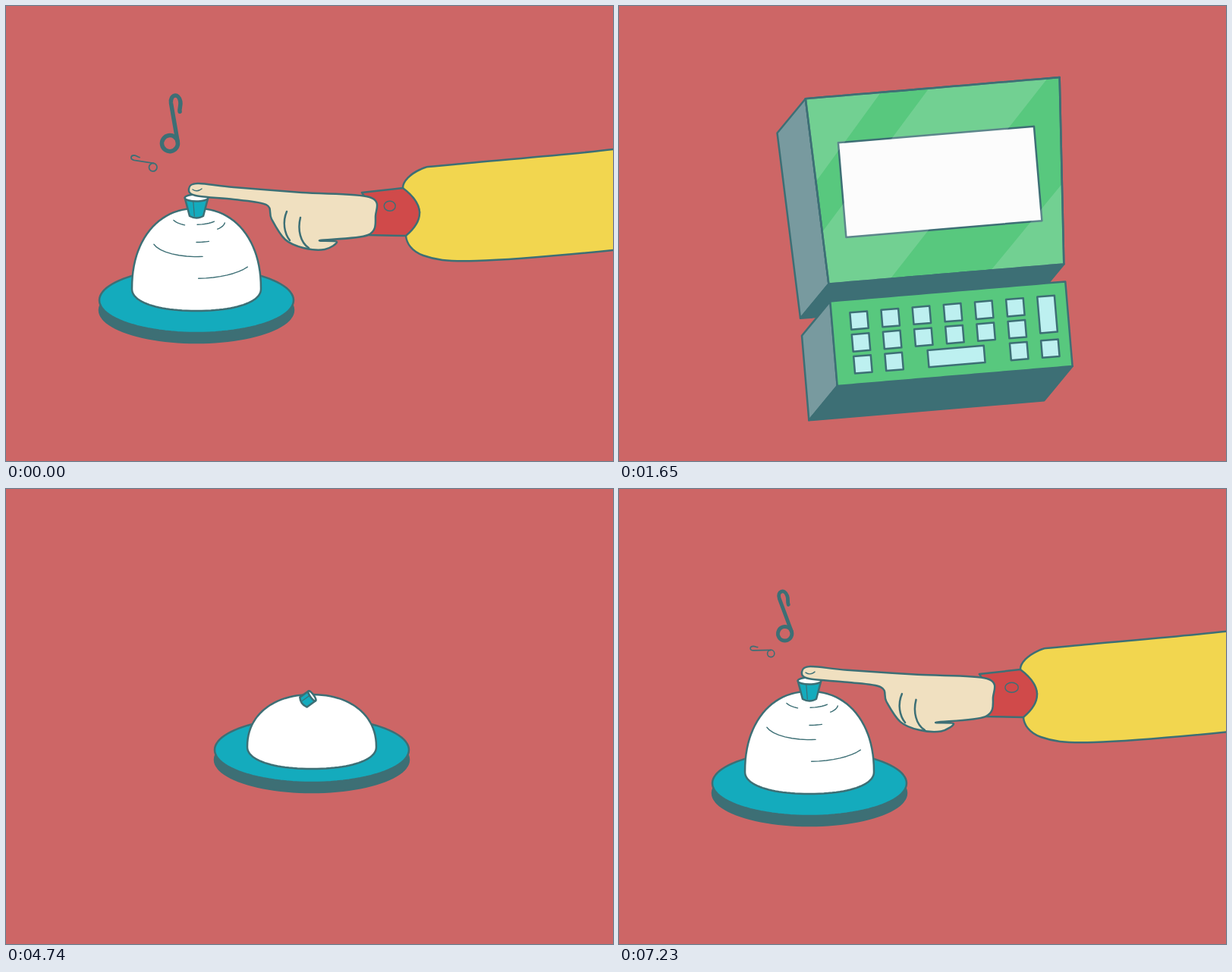
Recreate the animation shown at these times as an HTML page. Size 800 by 600 pixels, loop 7.26 s.

```html
<!DOCTYPE html>
<html lang="en">
<head>
<meta charset="utf-8">
<title>Service bell</title>
<style>
html, body { margin: 0; width: 100%; height: 100%; overflow: hidden; background: #cd6666; }
svg { display: block; width: 100vw; height: 100vh; }
</style>
</head>
<body>
<svg viewBox="0 0 800 600"><g id="stage" fill="none" stroke="#3d6f75" stroke-width="2.5" stroke-linejoin="round" stroke-linecap="round"></g></svg>
<script>
const LOOP = 7260, RING = 7130;
const DARK = '#3d6f75', TEAL = '#14abbd', GREEN = '#58c87e', SLATE = '#789a9f',
  SKIN = '#f0e0c0', PINK = '#d0567a';
const stage = document.getElementById('stage');

// ---- helpers
const clamp = (v, a = 0, b = 1) => Math.min(b, Math.max(a, v));
const ramp = (t, a, b) => clamp((t - a) / (b - a));
const smooth = u => u * u * (3 - 2 * u);
const ease = (t, a, b) => smooth(ramp(t, a, b));
const mix = (a, b, k) => a + (b - a) * k;
const mixAll = (a, b, k) => a.map((v, i) => mix(v, b[i], k));
const mixPts = (a, b, k) => a.map((p, i) => mixAll(p, b[i], k));
const add = (p, q, k = 1) => [p[0] + q[0] * k, p[1] + q[1] * k];
const rad = deg => deg * Math.PI / 180;
const heading = deg => [Math.sin(rad(deg)), -Math.cos(rad(deg))];
const rotate = ([x, y], deg) => {
  const c = Math.cos(rad(deg)), s = Math.sin(rad(deg));
  return [x * c - y * s, x * s + y * c];
};
const centre = q => [0, 1].map(i => q.reduce((s, p) => s + p[i], 0) / q.length);
const rgb = h => [1, 3, 5].map(i => parseInt(h.substr(i, 2), 16));
const blend = (a, b, k) => `rgb(${mixAll(rgb(a), rgb(b), k).map(Math.round)})`;

const str = p => p[0].toFixed(2) + ' ' + p[1].toFixed(2);
const path = (d, attrs = '') => `<path d="${d}" ${attrs}/>`;
const outline = pts => 'M' + pts.map(str).join('L') + 'Z';
const poly = (pts, attrs) => path(outline(pts), attrs);
const fill = c => `fill="${c}"`;
const flat = c => `fill="${c}" stroke="none"`;
const group = (transform, body) => `<g transform="${transform}">${body}</g>`;

// Closed curve through the points
function loop(pts, attrs) {
  const n = pts.length, p = i => pts[(i + n) % n];
  const tangent = i => add(p(i + 1), p(i - 1), -1);
  const bends = pts.map((a, i) =>
    [add(a, tangent(i), 1 / 6), add(p(i + 1), tangent(i + 1), -1 / 6), p(i + 1)].map(str).join(' '));
  return path(`M${str(pts[0])}C${bends.join(' ')}Z`, attrs);
}

// ---- bell
const REST = { x: 251, y: 388, turn: 0, stretch: 1, dome: 1, lift: 15, power: .92, wrinkle: 1,
  knobX: 0, knobLen: 38, knobTilt: 0, knobBend: 0, knobW: 9, flare: 1 };
const PRESSED = { ...REST, knobLen: 24, flare: 1.7 };
const TALL = { ...REST, x: 275, y: 202, turn: 9, stretch: 1.23, knobW: 7.5, knobLen: 39, knobX: -2 };
const LOW = { ...REST, x: 403, y: 344, dome: .65, lift: 4, wrinkle: 0, knobX: -11, knobTilt: 54, knobLen: 14, knobW: 8 };
const LEAN = { ...REST, x: 271, y: 312, turn: 34, stretch: .84, lift: 2, power: 1.2, knobTilt: -12, knobBend: 50, knobLen: 36, knobW: 6.5 };
const at = (pose, x, y) => ({ ...pose, x, y });
const HOME = at(REST, 403, 344);
const BELL = [
  [0, PRESSED], [420, PRESSED], [540, at(REST, 252, 375)], [810, TALL], [960, at(TALL, 300, 178)], [1300, at(REST, 411, 260)],
  [4000, LOW], [4740, LOW], [4950, HOME], [5110, { ...HOME, stretch: .9 }], [5300, at(TALL, 403, 312)], [5480, HOME],
  [5850, HOME], [6300, LEAN], [6480, REST], [7080, REST], [7140, PRESSED], [LOOP, PRESSED]
];

function bellAt(t) {
  const i = BELL.findIndex(row => t < row[0]), [t0, a] = BELL[i - 1], [t1, z] = BELL[i];
  const k = ease(t, t0, t1), b = {};
  for (const name in a) b[name] = mix(a[name], z[name], k);
  const wide = 1 / Math.sqrt(b.stretch);
  return Object.assign(b, { rx: 128 * wide, ry: 43 * b.stretch, w: 85 * wide, h: 106 * b.stretch * b.dome });
}
const place = (b, p) => add([b.x, b.y], rotate(p, b.turn));

const SEG = 24;
// Rounded outline, clockwise from its left end
function blob(b, rx, up, down, shift, power) {
  const bow = v => Math.sign(v) * Math.abs(v) ** power;
  return Array.from({ length: 4 * SEG }, (_, i) => {
    const a = Math.PI * (1 + i / (2 * SEG)), s = Math.sin(a);
    return place(b, [rx * bow(Math.cos(a)), bow(s) * (s < 0 ? up : down) + shift]);
  });
}
const domeOutline = b => blob(b, b.w, b.h, 29 * b.stretch, -b.lift, b.power);
const plateOutline = (b, drop = 0) => blob(b, b.rx, b.ry, b.ry, drop, 1);

// Box outline with as many points, from its lower left corner
function quadOutline([tl, tr, br, bl]) {
  const side = (p, q, n) => Array.from({ length: n }, (_, i) => mixAll(p, q, i / n));
  return [...side(bl, tl, SEG / 2), ...side(tl, tr, SEG), ...side(tr, br, SEG / 2), ...side(br, bl, 2 * SEG)];
}
const corners = o => [o[SEG / 2], o[SEG * 1.5], o[SEG * 2], o[0]];

function knob(b, size) {
  const up = heading(b.knobTilt), tip = heading(b.knobTilt + b.knobBend), half = b.knobLen * size / 2;
  const p0 = [b.knobX, 10], p1 = add(p0, up, half), p2 = add(p1, tip, half);
  const w0 = b.knobW * size, w1 = w0 * b.flare;
  const edge = s => [add(p0, [-up[1], up[0]], s * w0), add(p1, [-up[1] - tip[1], up[0] + tip[0]], s * (w0 + w1) / 4),
    add(p2, [-tip[1], tip[0]], s * w1)].map(str);
  const l = edge(-1), r = edge(1), shine = edge(-.3);
  return group(`translate(${b.x} ${b.y}) rotate(${b.turn}) translate(0 ${-b.lift - b.h})`,
    path(`M${l[0]}Q${l[1]} ${l[2]}L${r[2]}Q${r[1]} ${r[0]}Q${str(add(p0, up, -5))} ${l[0]}Z`, fill(TEAL)) +
    path(`M${shine[0]}Q${shine[1]} ${shine[2]}`, 'stroke-width="1.2"') +
    `<ellipse rx="${w1}" ry="${w1 * .3}" fill="#fff" transform="translate(${p2}) rotate(${b.knobTilt + b.knobBend})"/>`);
}

// Part of a ring around the dome at a level, between two angles
function wrinkle(b, level, from, to) {
  const r = 1 - .8 * level, pts = [];
  for (let i = 0; i <= 8; i++) {
    const a = rad(mix(from, to, i / 8));
    pts.push(place(b, [r * Math.cos(a) * b.w, -(level + .3 * r * (1 - Math.sin(a))) * b.h - b.lift]));
  }
  return 'M' + pts.map(str).join('L');
}
const wrinkles = (b, opacity) => path(
  wrinkle(b, .78, 160, 119) + wrinkle(b, .8, 88, 40) + wrinkle(b, .7, 42, 5) +
  wrinkle(b, .58, 90, 69) + wrinkle(b, .4, 166, 82) + wrinkle(b, .13, 88, 28),
  `stroke-width="1.4" opacity="${opacity}"`);

// ---- computer
const rect = (x, y, w, h) => [[x, y], [x + w, y], [x + w, y + h], [x, y + h]];
const onQuad = ([tl, tr, br, bl], u, v) => mixAll(mixAll(tl, tr, u), mixAll(bl, br, u), v);

// It drops in askew, bounces and straightens up
function computerAt(t) {
  const askew = 1 - ease(t, 1680, 1920), pivot = [411, 293], turn = -4.8 * askew;
  const swing = clamp((t - 1575) / 290, -.5, 2.33);
  const bounce = 42 * Math.sin(swing * Math.PI) * (1 - swing / 2.33);
  const put = p => add(add(pivot, rotate(add(p, pivot, -1), turn)), [-3 * askew, bounce]);
  const top = rect(276, 82, 311, 246), tall = 192 - 67 * askew;
  top[0][0] -= 10 * askew;
  top[1][0] += 15 * askew;
  return { askew, top: top.map(put), base: rect(276, 351, 311, 112).map(put),
    screen: rect(304, 206 - tall / 2, 259, tall).map(put), depth: rotate([-41, 42], turn) };
}

function sides([tl, , br, bl], depth, m) {
  const [tl2, bl2, br2] = [tl, bl, br].map(p => add(p, depth, m));
  return poly([tl, tl2, bl2, bl], fill(SLATE)) + poly([bl, bl2, br2, br], fill(DARK));
}

function keys(quad, narrow, size, depth) {
  const key = (col, row, w = 36, h = 22.5) => {
    const cx = 18 + 41.3 * col + w / 2, cy = 17 + 29 * row + h / 2, hw = w * narrow * size / 2, hh = h * size / 2;
    const face = o => rect(cx - hw - o, cy - hh + o, 2 * hw, 2 * hh).map(([x, y]) => onQuad(quad, x / 311, y / 112));
    return (depth > 0 ? poly(face(depth), fill(DARK)) : '') + poly(face(0), fill('#bdf0f0'));
  };
  let out = key(6, 0, 36, 48) + key(2, 2, 118);
  for (let row = 0; row < 3; row++)
    for (let col = 0; col < 7; col++) {
      const covered = row == 2 ? col > 1 && col < 5 : col == 6;
      if (!covered) out += key(col, row);
    }
  return out;
}

function sheen(quad, opacity) {
  const band = (a, z) => poly([[a, 0], [z, 0], [z - .69, 1], [a - .69, 1]].map(p => onQuad(quad, ...p)), flat('#fff'));
  return `<clipPath id="glass">${poly(quad)}</clipPath><g clip-path="url(#glass)" opacity="${opacity}">` +
    band(-.1, .296) + band(.486, .952) + band(1.38, 1.8) + '</g>';
}

function girl(t) {
  const u = ramp(t, 2380, 2980);
  const size = (1 - Math.exp(-6 * u) * Math.cos(9 * u)) * (1 - ease(t, 3990, 4130));
  if (size < .01) return '';
  const wave = Math.sin((t - 3270) / 110);
  const sway = 5 * wave * (1 - ramp(t, 2800, 3800)), nod = .7 * wave * (1 - ramp(t, 2900, 3600));
  const tail = 498 + sway;
  const eye = x => path(`M${x} 224a10 10 0 0 1 20 0`, 'stroke-width="4"');
  return group(`translate(432 212) rotate(${nod}) scale(${size}) translate(-432 -212)`,
    path(`M470 190L497 200C500 225 ${493 + sway * .5} 255 ${tail} 286H${tail - 38}Q${454 + sway * .4} 268 456 245Z`, flat(DARK)) +
    '<circle cx="430" cy="212" r="52" fill="#f0dcb8"/>' +
    path('M366 209C367 185 376 166 388 154C400 139 418 134 431 134.5C470 136 492 165 496 200L497 209Z', flat(DARK)) +
    path('M387 155C410 133 445 128 468 150C488 168 491 190 491 208H484C484 185 478 168 462 153C440 134 410 140 387 155Z', flat(PINK)) +
    path('M486 227C486 242 474 252 445 252', `stroke="${TEAL}" stroke-width="5"`) +
    `<circle cx="486.5" cy="214" r="11" fill="${PINK}" stroke-width="2"/>` + eye(391) + eye(443) +
    path('M419 243H439C439 258 419 258 419 243Z', 'fill="#fff" stroke-width="3"'));
}

// The dome turns into the monitor and the plate into the keyboard, and back
function bellAndComputer(t) {
  const m = ease(t, 1020, 1380) - ease(t, 4020, 4640);
  const b = bellAt(t), pc = computerAt(t);
  const upper = mixPts(domeOutline(b), quadOutline(pc.top), m);
  const lower = mixPts(plateOutline(b), quadOutline(pc.base), m);
  const q = corners(upper), board = corners(lower), details = clamp(m * 2.5 - 1.5);

  let front = (m > 0 ? sides(q, pc.depth, m) : '') + poly(upper, fill(blend('#ffffff', GREEN, m)));
  let tray = m > 0 ? sides(board, pc.depth, m) : '';
  if (m < 1) tray += poly(mixPts(plateOutline(b, 13), quadOutline(pc.base), m), fill(DARK));
  tray += poly(lower, fill(blend(TEAL, GREEN, m)));
  if (details > 0) {
    const from = centre(pc.top), to = centre(q);
    const screen = pc.screen.map(p => add(to, add(p, from, -1), details));
    front += poly(screen, fill('#fcfcfc')) + girl(t) + sheen(q, .16 * details) + poly(upper);
    tray += keys(board, 1 - .37 * pc.askew, details, 2.5 * ramp(t, 2180, 2420));
  }
  const left = 1 - m * 3;
  return (m > .5 ? front + tray : tray + front) + (left > 0 ? wrinkles(b, b.wrinkle * left) + knob(b, left) : '');
}

// ---- arm: pointing shape, and the same parts moved into a loose fist
const WRIST = [[477, 302], [487, 277], [479, 252], [390, 246]];
const FINGER = [[300, 239], [252, 234], [241, 241], [250, 250], [300, 255], [343, 262]];
const CURLED = [[435, 254], [404, 268], [393, 298], [406, 313], [412, 292], [421, 277]];
const PALM = [[350, 281], [368, 308], [392, 319], [420, 321], [436, 311], [414, 309]];
const CUFF = [[469, 246], [523, 240], [527, 303], [476, 302]];
const LOOSE_CUFF = [[593, 261], [641, 251], [640, 320], [596, 306]];
const SLEEVE = [[545, 216], [590, 209], [800, 189], [900, 170], [900, 308], [800, 322], [620, 336], [550, 329]];
const LOOSE_SLEEVE = [[650, 227], [685, 223], [800, 222], [900, 221], [900, 357], [800, 357], [700, 357], [649, 345]];

function reach(t) {
  if (t < RING - 1500) {
    const out = ramp(t, 330, 780) ** 2;
    return { k: 1, dx: 570 * out, dy: -60 * out };
  }
  const dy = 170 * (Math.exp((6300 - t) / 123) - 1 + ease(t, 6900, 7150));
  return { k: ease(t, 6300, 6700), dx: Math.max(0, dy) * .4, dy };
}

function arm(t) {
  const { k, dx, dy } = reach(t);
  if (dx > 565 || dy > 420) return '';
  // the sleeve slides up while the fingertip stays on the knob
  const slide = t > 7100 ? 12 * Math.sqrt(1 - ramp(t, 7140, LOOP)) * ramp(t, 7100, 7140) : 0;
  const settle = ([x, y]) => {
    const s = slide * ramp(x, 270, 470);
    return [x + s, y - s * .35];
  };
  const moved = (pts, shift) => pts.map(p => settle(add(p, shift, 1 - k)));
  const palm = pts => moved(pts, [71, 10]);
  const blendTo = (loose, firm) => mixPts(loose, firm, k).map(settle);

  const cuff = blendTo(LOOSE_CUFF, CUFF), [a, b, c, d] = cuff;
  const bulge = add(mixAll(b, c, .5), [20, 0]);
  const sleeve = [b, ...blendTo(LOOSE_SLEEVE, SLEEVE), c, bulge];
  const hand = [...moved(WRIST, [124, 15]), ...blendTo(CURLED, FINGER), ...palm(PALM)];
  const knuckle = (...pts) => {
    const p = palm(pts).map(str);
    return path(`M${p[0]}C${p[1]} ${p[2]} ${p[3]}`);
  };
  const button = add(centre(cuff), [mix(4, 7, k) + slide, mix(-2, -9, k)]);
  const nail = mixAll([402, 302], [252, 242], k);
  return group(`translate(${dx} ${dy})`,
    loop(sleeve, fill('#f2d64f')) +
    path(`M${str(a)}L${str(b)}Q${str(add(bulge, [20, 0]))} ${str(c)}L${str(d)}Q${str(add(mixAll(a, d, .5), [16, 0]))} ${str(a)}Z`, fill('#d04a4a')) +
    `<ellipse cx="${button[0]}" cy="${button[1]}" rx="${7.5 + slide * .2}" ry="6.5" stroke-width="1.4"/>` +
    loop(hand, fill(SKIN)) +
    knuckle([370, 271], [364, 285], [367, 300], [374, 309]) + knuckle([388, 279], [384, 295], [388, 312], [399, 319]) +
    group(`translate(${nail}) rotate(${80 * (1 - k)})`, path('M-6 0Q0 4 6 -1', 'stroke-width="1.4"')));
}

// ---- notes: drift away from the knob, swinging and slowing down
function note(t, { dx, dy, turn, size, weight }) {
  const age = (t < 3000 ? t + LOOP : t) - RING;
  if (age <= 0 || age > 720) return '';
  const far = 1 - Math.exp(-age / 180);
  const swing = 24 * Math.sin((age - 152) / 50) * Math.exp(-Math.max(0, age - 150) / 200);
  const scale = size * Math.sqrt(clamp(age / 130)) * (1 - ease(age, 550, 720));
  return group(`translate(${232 + dx * far} ${238 + dy * far}) rotate(${turn + swing}) scale(${scale})`,
    path('M10.5 0V-52C11 -64 23 -64 23 -52C23 -46 20 -44 20 -39', `stroke-width="${weight}"`) +
    `<circle r="10.5" stroke-width="${weight}"/>`);
}

function draw(t) {
  stage.innerHTML = bellAndComputer(t) +
    note(t, { dx: -31, dy: -110, turn: 0, size: 1, weight: 5.5 }) +
    note(t, { dx: -74, dy: -49, turn: -71, size: .5, weight: 3.6 }) + arm(t);
}

const start = performance.now();
function tick(now) {
  draw(Math.max(0, now - start) % LOOP);
  requestAnimationFrame(tick);
}
draw(0);
requestAnimationFrame(tick);
</script>
</body>
</html>
```
